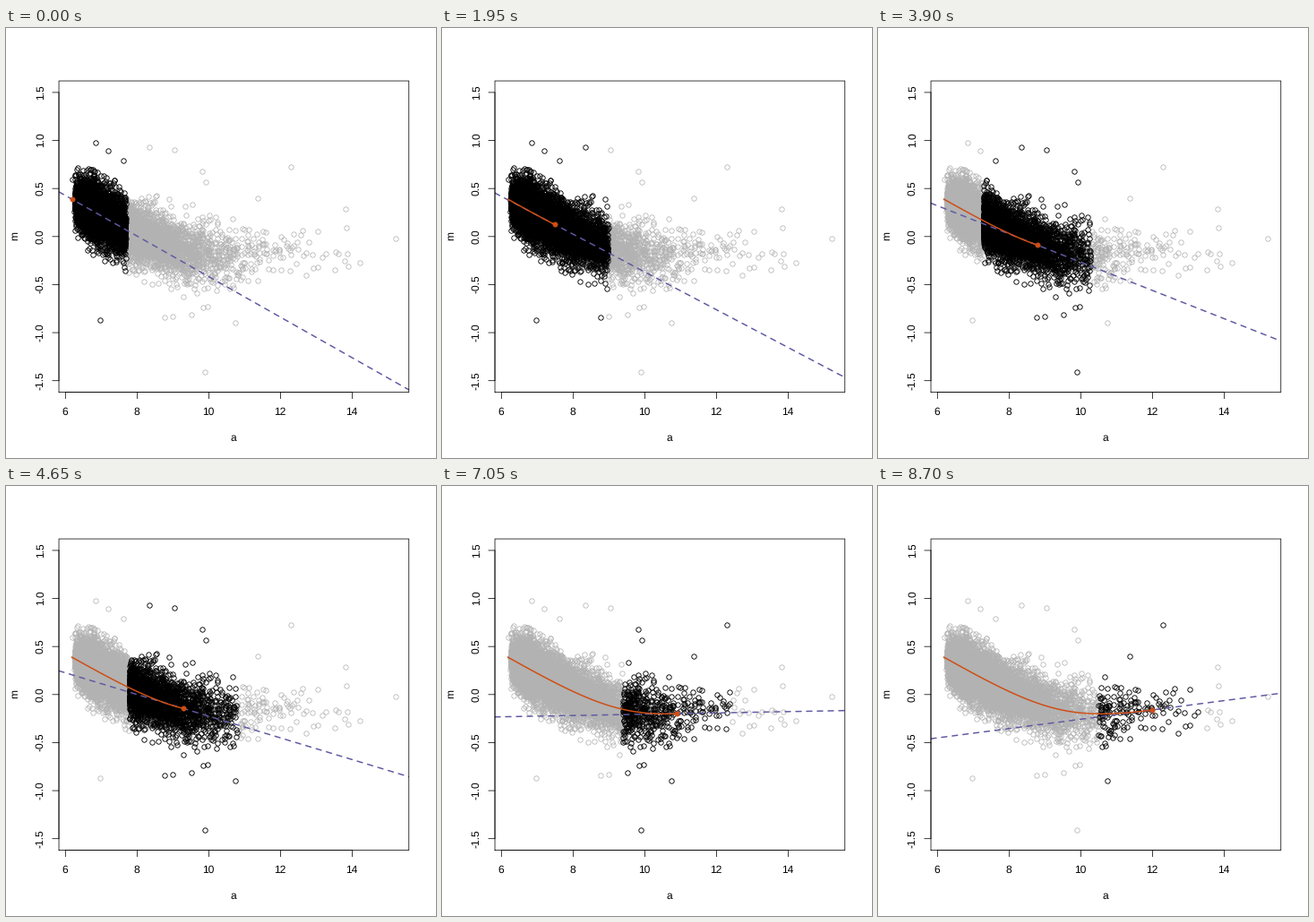
These frames come from a looping animation (480 by 480 pixels, 8.85 s). A matplotlib script:

```python
import numpy as np
import matplotlib.pyplot as plt
from matplotlib.animation import FuncAnimation

# thin lines stay antialiased at their true position
plt.rcParams.update({"font.family": "Liberation Sans", "path.snap": False,
                     "text.hinting": "none"})

SIZE, FRAMES, STEP = 480, 59, 150
LEFT, RIGHT, TOP, BOTTOM = 59.04, 449.76, 59.04, 406.56
X0, X1, Y0, Y1 = 5.818, 15.582, -1.62, 1.62
PX = (X1 - X0) / (RIGHT - LEFT)      # data units per pixel
PY = (Y1 - Y0) / (BOTTOM - TOP)
START, STRIDE, HALF = 6.18, 0.1, 1.5
GREY, PURPLE, ORANGE = "#b2b2b2", "#605aa3", "#cf4e14"


def fit_at(x):
    """Smoothed trend: a steady fall that bends into a gentle rise."""
    return (0.3837 - 0.215 * (x - START)
            + 0.2415 * np.log1p(np.exp(1.15 * (x - 9.5))))


def slope_at(x):
    """Slope of the local line; it follows the trend a little late."""
    return -0.2155 + 0.285 / (1 + np.exp(-1.15 * (x - 9.78)))


OUTLIERS = np.array([
    (6.18, 0.595), (6.85, 0.98), (7.19, 0.89), (7.61, 0.79), (8.35, 0.935),
    (9.04, 0.9), (9.82, 0.68), (9.91, 0.57), (11.37, 0.4), (12.3, 0.73),
    (6.96, -0.865), (8.77, -0.845), (9.0, -0.83), (9.51, -0.815),
    (9.88, -1.41), (10.73, -0.9), (14.21, -0.27), (15.22, -0.02),
])


def cloud(n=8600):
    """Dense scatter that thins out to the right."""
    rng = np.random.default_rng(8)
    x = 6.25 + rng.gamma(1.4, 0.9, n)
    z = rng.standard_t(9, n)
    keep = (x < 14) & (np.abs(z) < 3.9)
    x, z = x[keep], z[keep]
    sd = np.interp(x, [6.25, 6.7, 8, 10, 12], [0.095, 0.118, 0.117, 0.15, 0.12])
    return x, fit_at(np.minimum(x, 12.3)) + sd * z


a, m = (np.append(v, o) for v, o in zip(cloud(), OUTLIERS.T))
centers = START + STRIDE * np.arange(FRAMES)
fit, slope = fit_at(centers), slope_at(centers)

fig = plt.figure(figsize=(SIZE / 72, SIZE / 72), dpi=72, facecolor="white")
ax = fig.add_axes([LEFT / SIZE, 1 - BOTTOM / SIZE,
                   (RIGHT - LEFT) / SIZE, (BOTTOM - TOP) / SIZE])
ax.set(xlim=(X0, X1), ylim=(Y0, Y1))
ax.axis("off")


def stroke(xs, ys):
    ax.plot(xs, ys, color="black", lw=0.75, clip_on=False, zorder=10,
            solid_capstyle="round")


def label(x, y, s, angle=0):
    """Text centred along its baseline at a stage pixel."""
    fig.text(x / SIZE, 1 - y / SIZE, s, fontsize=12, rotation=angle,
             ha="center", va="baseline", rotation_mode="anchor")


stroke([X0, X1, X1, X0, X0], [Y0, Y0, Y1, Y1, Y0])
stroke([6, 14], [Y0, Y0])
stroke([X0, X0], [-1.5, 1.5])
for t in range(6, 15, 2):
    stroke([t, t], [Y0, Y0 - 7.2 * PY])
    label(LEFT + (t - X0) / PX - 0.7, 432, f"{t}")
for t in np.arange(-1.5, 1.6, 0.5):
    stroke([X0, X0 - 7.2 * PX], [t, t])
    label(41.8, TOP + (Y1 - t) / PY - 0.5, f"{t:.1f}", 90)
label((LEFT + RIGHT) / 2 - 0.7, 461, "a")
label(12.96, (TOP + BOTTOM) / 2 - 0.5, "m", 90)

ring = dict(ls="none", marker="o", ms=5.4, mfc="none", mew=0.75)
ax.plot(a, m, mec=GREY, zorder=2, **ring)
window, = ax.plot([], [], mec="black", zorder=3, **ring)
tangent, = ax.plot([], [], color=PURPLE, lw=1.5, ls=(0, (4, 4)),
                   dash_capstyle="round", zorder=4)
curve, = ax.plot([], [], color=ORANGE, lw=1.5, zorder=5)
dot, = ax.plot([], [], "o", color=ORANGE, ms=5.4, mew=0.5, zorder=6)


def draw(i):
    c = centers[i]
    near = np.abs(a - c) <= HALF
    window.set_data(a[near], m[near])
    ends = np.array([X0, X1])
    tangent.set_data(ends, fit[i] + slope[i] * (ends - c))
    curve.set_data(centers[:i + 1], fit[:i + 1])
    dot.set_data([c], [fit[i]])
    return window, tangent, curve, dot


anim = FuncAnimation(fig, draw, frames=FRAMES, interval=STEP,
                     repeat=True, repeat_delay=0)
plt.show()
```
